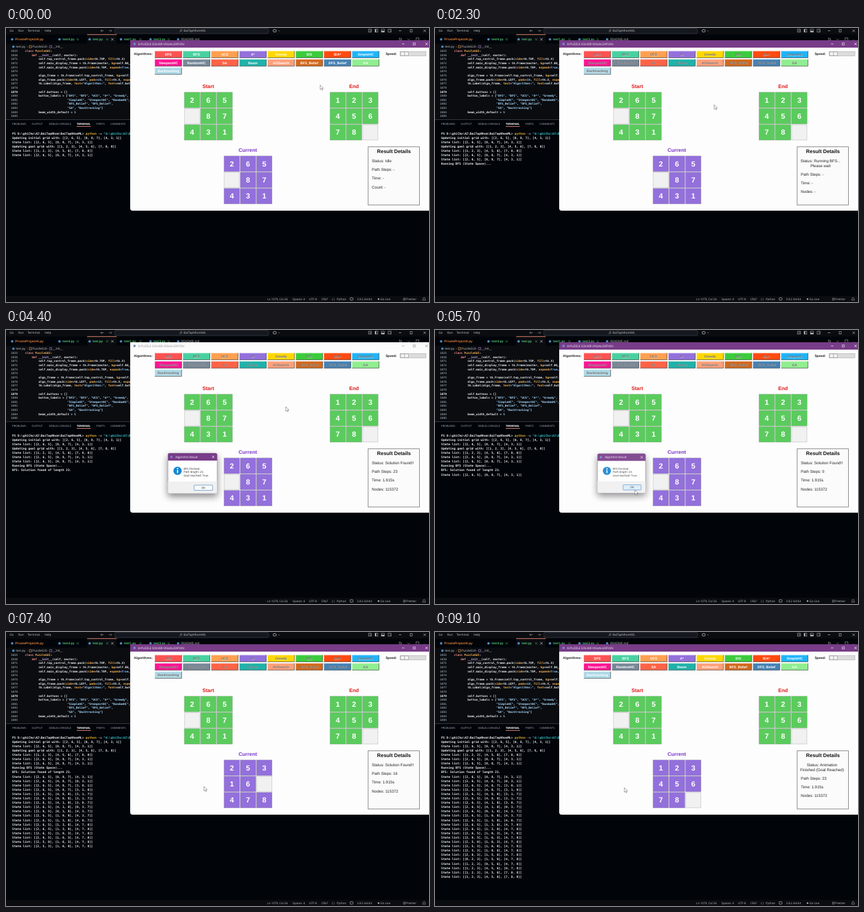
Write an HTML page that moves like this. It is 688 px wide and 447 px high and loops after 9.2 s.

```html
<!DOCTYPE html>
<html>
<head>
<meta charset="utf-8">
<title>8-puzzle solver</title>
<style>
html, body { margin: 0; width: 100%; height: 100%; overflow: hidden; background: #010409; }
svg { display: block; width: 688px; height: 447px; text-rendering: geometricPrecision; }
text { white-space: pre; }
.ui { font-family: "Open Sans", sans-serif; }
.tk { font-family: "Liberation Sans", Arial, sans-serif; }
.mono { font-family: "DejaVu Sans Mono", monospace; font-weight: 700; }
#dialog { filter: drop-shadow(0 5px 6px #0007); transform-origin: 303px 234px; }
</style>
</head>
<body>
<svg viewBox="0 0 688 447">
  <g id="editor"></g>
  <g id="term"></g>
  <g id="app"></g>
  <g id="live"></g>
  <g id="dialog"></g>
  <path id="cursor" d="M0 0V7.4L1.8 5.8L3 8.4L4.2 7.9L3.1 5.4H5.2Z" fill="#fff" stroke="#444" stroke-width=".5"/>
</svg>
<script>
const LOOP = 9200, CLICK = 1200, FOUND = 3200, CLOSE = 5660, PLAY = 5690, STEP = 105;
const ACCENT = '#783c88', EDITOR = '#0a0c10', PANEL = '#010409', ORANGE = '#ff967d';
const $ = id => document.getElementById(id);
const esc = s => String(s).replace(/&/g, '&amp;').replace(/</g, '&lt;');

// y is the optical middle of the line
const text = (x, y, s, size, fill, font = 'ui', extra = '') =>
  `<text class="${font}" x="${x}" y="${y + size * .35}" font-size="${size}" fill="${fill}" ${extra}>${s}</text>`;
const mid = 'text-anchor="middle" ', bold = 'font-weight="700"';
const rect = (x, y, w, h, fill, extra = '') =>
  `<rect x="${x}" y="${y}" width="${w}" height="${h}" fill="${fill}" ${extra}/>`;
const line = (d, color, w = .7) => `<path d="${d}" fill="none" stroke="${color}" stroke-width="${w}"/>`;
const dot = (x, y, r, fill) => `<circle cx="${x}" cy="${y}" r="${r}" fill="${fill}"/>`;
const cross = (x, y, color) => line(`M${x - 2} ${y - 2}l4 4m0 -4l-4 4`, color);
const winButtons = (xs, y, color) =>
  line(`M${xs[0] - 2} ${y}h4`, color) +
  rect(xs[1] - 1.8, y - 1.8, 3.6, 3.6, 'none', `stroke="${color}" stroke-width=".6"`) + cross(xs[2], y, color);

// --- puzzle ---------------------------------------------------------
const start = [2, 6, 5, 0, 8, 7, 4, 3, 1], goal = [1, 2, 3, 4, 5, 6, 7, 8, 0];
const shift = { U: -3, D: 3, L: -1, R: 1 };
const states = [start];
for (const m of 'DRRULDLURDRULURDLULDDRR') {
  const s = [...states.at(-1)], a = s.indexOf(0), b = a + shift[m];
  [s[a], s[b]] = [s[b], s[a]];
  states.push(s);
}
const show = s => `[${[0, 3, 6].map(i => `[${s.slice(i, i + 3).join(', ')}]`).join(', ')}]`;
const stateLine = s => 'State list: ' + show(s);

function grid(x0, y0, cells, color) {
  return cells.map((n, i) => {
    const x = x0 + i % 3 * 26.4, y = y0 + Math.floor(i / 3) * 26.4;
    return n
      ? rect(x, y, 25.4, 25.4, color, 'stroke="#9a9a9a" stroke-width=".4"') +
        text(x + 12.7, y + 12.6, n, 12, '#fff', 'tk', mid + bold)
      : rect(x + .3, y + .3, 24.8, 24.8, '#f1f1f1', 'stroke="#888" stroke-width=".6" stroke-dasharray="1 .8"');
  }).join('');
}

// --- code editor ----------------------------------------------------
const code = `class PuzzleGUI:
    def __init__(self, master):
        self.top_control_frame.pack(side=tk.TOP, fill=tk.X)
        self.main_display_frame = tk.Frame(master, bg=self.BG_COLOR)
        self.main_display_frame.pack(side=tk.TOP, expand=True, fill=tk.BOTH)

        algo_frame = tk.Frame(self.top_control_frame, bg=self.BG_COLOR)
        algo_frame.pack(side=tk.LEFT, padx=10, fill=tk.X, expand=True)
        tk.Label(algo_frame, text="Algorithms:", font=self.button_font)

        self.buttons = []
        button_labels = ["DFS", "BFS", "UCS", "A*", "Greedy", "IDS", "IDA*",
                         "SimpleHC", "SteepestHC", "RandomHC", "SA",
                         "BFS_Belief", "DFS_Belief",
                         "GA", "Backtracking"]
        beam_width_default = 5`.split('\n');
const hues = ['#addcff', '#ff9492', '#ffb757', '#dbb7ff', '#91cbff'];
const paint = s => s.replace(
  /("[^"]*"?)|\b(class|def)\b|\b(PuzzleGUI|\w+(?==))|\b(__init__)\b|\b(\d+|True)\b/g,
  (m, ...g) => `<tspan fill="${hues[g.findIndex(v => v)]}">${m}</tspan>`);

function editor() {
  let o = rect(0, 0, 688, 447, PANEL) + rect(0, 0, 688, 149, EDITOR) + rect(0, 10.5, 688, 15, PANEL);
  [['Go', 6], ['Run', 20], ['Terminal', 35], ['Help', 63]].forEach(([s, x]) => o += text(x, 4.5, s, 4.9, '#ccc'));
  o += line('M159 4.5h-5m2 -2l-2 2l2 2', '#999') + line('M167 4.5h5m-2 -2l2 2l-2 2', '#777');
  o += rect(177, .5, 250, 8.5, '#15181e', 'rx="2" stroke="#4a505a" stroke-width=".5"');
  o += `<circle cx="285" cy="4" r="1.4" fill="none" stroke="#bbb" stroke-width=".5"/>` + line('M284 5l-1.5 1.7', '#bbb', .5);
  o += text(289, 4.5, 'BaiTapNhomML', 4.9, '#ccc');
  o += rect(434.5, 2.5, 5, 4, 'none', 'rx="1.5" stroke="#bbb" stroke-width=".8"') + line('M443 4l1.2 1.2l1.2 -1.2', '#aaa', .5);
  [592, 602.5, 613, 624].forEach((x, i) => {
    o += rect(x - 2.3, 2, 4.6, 4.8, 'none', 'stroke="#bbb" stroke-width=".6"');
    o += [line(`M${x} 2v4.8m0 -2.4h2.3`, '#bbb', .5), rect(x - 2.3, 2, 2, 4.8, '#bbb'),
      rect(x - 2.3, 4.5, 4.6, 2.3, '#bbb'), line(`M${x + .8} 2v4.8`, '#bbb', .5)][i];
  });
  o += winButtons([641, 659, 681], 4.5, '#ccc');

  o += rect(132, 10.5, 48, 15, EDITOR) + rect(132, 10.3, 48, .9, ORANGE);
  [['PrivateProjectAI.py', 15, '#ff9040'], ['test4.py', 92, '#5fdc84', 115], ['test.py', 141, '#5fdc84', 163],
    ['test1.py', 192, '#5fdc84', 217], ['test3.py', 240, '#5fdc84', 263], ['README.md', 285, '#999']]
    .forEach(([s, x, c, u]) => {
      o += dot(x - 5, 18.5, 2, '#4a8ac0') + text(x, 18.5, s, 5, c, 'ui', 'font-weight="600"');
      if (u) o += text(u, 18.5, 'U', 4.9, '#5fdc84');
    });
  o += cross(173, 18.5, '#ddd') + line('M640 16v5l4 -2.5z', '#ccc', .6) + line('M653 17.5l2 2l2 -2', '#aaa', .6);
  o += rect(667, 16, 4.5, 4.5, 'none', 'stroke="#bbb" stroke-width=".6"') + text(679, 18, '…', 5, '#ccc');
  o += dot(12, 30.5, 2, '#4a8ac0') + text(16, 30.5, 'test.py', 5, '#ccc') + text(34, 30.5, '›', 5, '#aaa') +
    rect(38, 28.8, 3.4, 3.4, 'none', 'stroke="#e8a050" stroke-width=".7"') + text(43, 30.5, 'PuzzleGUI', 5, '#ccc') +
    text(67, 30.5, '›', 5, '#aaa') + rect(71, 28.8, 3.4, 3.4, 'none', 'stroke="#b180d7" stroke-width=".7"') +
    text(76, 30.5, '__init__', 5, '#ccc');

  code.forEach((s, i) => {
    const y = 37.6 + i * 6.63, n = i > 1 ? 1069 + i : [1025, 1036][i];
    o += text(8, y, n, 4.58, n === 1079 ? '#fff' : '#8b939e', 'mono') + text(31, y, paint(s), 4.58, '#f0f3f6', 'mono');
  });
  o += text(8, 143.6, 1085, 4.58, '#8b939e', 'mono');

  o += rect(0, 149, 202, .6, '#5a616b');
  [['PROBLEMS', 10], ['OUTPUT', 42], ['DEBUG CONSOLE', 70], ['TERMINAL', 115], ['PORTS', 147], ['COMMENTS', 170]]
    .forEach(([s, x]) => o += text(x, 156, s, 4.4, x === 115 ? '#fff' : '#b0b6be', 'ui', x === 115 ? bold : ''));
  o += rect(115, 160.2, 23, .9, ORANGE);

  o += rect(0, 437, 688, 10, EDITOR);
  [['Ln 1079, Col 26', 425], ['Spaces: 4', 466], ['UTF-8', 493], ['CRLF', 513], ['{ }', 530], ['Python', 538],
    ['3.8.2 64-bit', 571], ['Go Live', 609], ['Prettier', 651]].forEach(([s, x]) => o += text(x, 442.3, s, 4.7, '#c4c8ce'));
  o += rect(559.5, 440, 5, 4, 'none', 'rx="1.5" stroke="#bbb" stroke-width=".8"') + dot(606, 442.3, 1.3, '#bbb');
  o += `<circle cx="648" cy="442.3" r="1.9" fill="none" stroke="#bbb" stroke-width=".6"/>` + line('M646.7 443.6l2.6 -2.6', '#bbb', .5);
  return o + line('M677.5 444h5l-.8 -1v-1.5a1.7 1.7 0 0 0 -3.4 0v1.5z', '#bbb', .6);
}

// --- solver window --------------------------------------------------
const buttons = [
  ['DFS', '#ff5252'], ['BFS', '#48d1a0'], ['UCS', '#ffa050'], ['A*', '#9370db'],
  ['Greedy', '#ffd700'], ['IDS', '#3ccb3c'], ['IDA*', '#ff4a10'], ['SimpleHC', '#1eb4fa'],
  ['SteepestHC', '#ff1493'], ['RandomHC', '#778899'], ['SA', '#ff6347'], ['Beam', '#20b2aa'],
  ['AOSearch', '#ffa07a'], ['BFS_Belief', '#d2691e'], ['DFS_Belief', '#4682b4'], ['GA', '#90ee90'],
  ['Backtracking', '#add8e6']];
const place = i => [242 + i % 8 * 45.85, 37.5 + Math.floor(i / 8) * 13.5];

function app() {
  let o = '<path d="M202 20H688V298H206Q202 298 202 294Z" fill="#fdfdfd"/>';
  o += text(208, 42, 'Algorithms:', 5.4, '#222', 'tk', bold) + text(617.5, 42.5, 'Speed:', 5.4, '#222', 'tk', bold);
  o += rect(641, 38.5, 42, 7, '#dcdcdc', 'stroke="#999" stroke-width=".5"') +
    rect(642, 39, 12.5, 6, '#f4f4f4', 'stroke="#777" stroke-width=".5"') + line('M648.2 39v6', '#777', .6);
  buttons.forEach(([, c], i) => {
    const [x, y] = place(i);
    o += rect(x, y, 44, 11.4, c) + line(`M${x} ${y + 11}V${y + .3}H${x + 44}`, '#fff9', .6) +
      line(`M${x} ${y + 11.1}H${x + 43.7}V${y}`, '#555', .8);
  });
  o += text(329, 95, 'Start', 8.3, '#e01818', 'tk', mid + bold) + text(566, 95, 'End', 8.3, '#e01818', 'tk', mid + bold) +
    text(393.3, 199, 'Current', 8.3, '#7a35c8', 'tk', mid + bold);
  o += grid(290, 104.8, start, '#5bcb5e') + grid(527, 104.8, goal, '#5bcb5e');
  return o + rect(589, 193.8, 83.5, 95, '#fbfbfb', 'stroke="#666" stroke-width=".8"') +
    text(631, 201.5, 'Result Details', 8.3, '#111', 'tk', mid + bold);
}

function titleBar(focused) {
  const ink = focused ? '#fff' : '#8a8a8a';
  return rect(202, 20, 486, 12, focused ? ACCENT : '#fbfbfb') + dot(209, 26, 2, '#6f8fd0') +
    text(215, 26, '8-PUZZLE SOLVER VISUALIZATION', 4.8, ink) + winButtons([646, 664, 684], 26, ink);
}

function dialog(hover) {
  return rect(263.4, 201, 80, 65.6, '#fff', 'rx="2.5" stroke="#8a6a96" stroke-width=".5"') +
    `<path d="M263.4 213V203.5Q263.4 201 265.9 201H340.9Q343.4 201 343.4 203.5V213Z" fill="${ACCENT}"/>` +
    '<path d="M263.4 247H343.4V264.1Q343.4 266.6 340.9 266.6H265.9Q263.4 266.6 263.4 264.1Z" fill="#f0f0f0"/>' +
    dot(269, 207, 1.8, '#6f8fd0') + text(275.5, 207, 'Algorithm Result', 4.7, '#fff') + cross(337, 207, '#fff') +
    dot(279, 229.7, 6.8, '#1a86d0') + rect(278.2, 228.3, 1.7, 5.2, '#fff') + dot(279.05, 226.2, 1.1, '#fff') +
    ['BFS finished.', 'Path length: 23.', 'Goal reached: True.'].map((s, i) => text(289, 226 + i * 5.6, s, 4.5, '#222')).join('') +
    rect(306, 253, 30, 8.6, hover ? '#dcecf8' : '#fafafa', 'rx="1" stroke="#3a86c4" stroke-width=".7"') +
    text(321, 257.2, 'OK', 4.5, '#222', 'ui', mid);
}

function labels(active) {
  return buttons.map(([s], i) => {
    const [x, y] = place(i), put = (d, c) => text(x + 22 + d, y + 5.6 + d, s, 5.5, c, 'tk', mid + bold);
    return active ? put(0, '#fff') : put(.5, '#fff8') + put(0, '#6d6d6d');
  }).join('');
}

function results(t, step, done) {
  const running = t >= CLICK && t < FOUND, found = t >= FOUND;
  const status = done ? ['Status: Animation', 'Finished (Goal Reached)'] :
    found ? ['Status: Solution Found!!'] : running ? ['Status: Running BFS...', 'Please wait'] : ['Status: Idle'];
  const two = status.length > 1, put = (x, y, s, e) => text(x, y, s, 6.4, '#222', 'tk', e);
  let o = status.map((s, i) => two ? put(done ? 629.5 : 627, 217 + i * 7.3, s, mid) : put(595, 217, s)).join('');
  return o + [`Path Steps: ${found ? (step < 0 ? 23 : step) : '-'}`, `Time: ${found ? '1.915s' : '-'}`,
    `${t < CLICK ? 'Count' : 'Nodes'}: ${found ? 115372 : '-'}`]
    .map((s, i) => put(595, (two ? 238.3 : 231) + i * 14.2, s)).join('');
}

function terminal(t, step) {
  const out = ['Updating initial grid with: ' + show(start), stateLine(start),
    'Updating goal grid with: ' + show(goal), stateLine(goal), stateLine(start)];
  if (t >= CLICK) out.push(stateLine(start), 'Running BFS (State Space)...');
  if (t >= FOUND) out.push('BFS: Solution found of length 23.');
  out.push(...states.slice(0, step + 1).map(stateLine));
  const prompt = 'PS D:\\ghiChu\\AI\\BaiTapNhom\\BaiTapNhomML&gt; <tspan fill="#f0b72f">python</tspan> ' +
    '<tspan fill="#9ea7b3">-u</tspan> <tspan fill="#39c5cf">"d:\\ghiChu\\AI\\BaiTapNhom</tspan>';
  return [prompt, ...out.map(esc)].map((s, i) => text(10, 172 + i * 7.1, s, 4.85, '#f0f3f6', 'mono')).join('');
}

// --- motion ---------------------------------------------------------
const path = [[0, 511, 93], [250, 511, 93], [950, 311, 44], [1250, 311, 44], [1500, 334, 56], [2200, 454, 125],
  [4600, 455, 125], [5350, 325, 260], [5750, 325, 261], [6500, 322, 252], [7500, 322, 252], [9000, 308, 254], [LOOP, 308, 254]];
function pointer(t) {
  const i = path.findIndex(p => p[0] > t), a = path[i - 1], b = path[i];
  const u = (t - a[0]) / (b[0] - a[0]), k = u * u * (3 - 2 * u);
  return [1, 2].map(j => a[j] + (b[j] - a[j]) * k);
}

$('editor').innerHTML = editor();
$('app').innerHTML = app();
let last = '';

function draw(t) {
  const raw = Math.floor((t - PLAY) / STEP), step = Math.max(-1, Math.min(23, raw));
  const done = raw > 23, active = t < CLICK || done, hover = t > 5300;
  const focused = t < FOUND || t >= CLOSE;
  const key = [t < CLICK, t < FOUND, step, done, hover, focused].join();
  if (key !== last) {
    last = key;
    $('term').innerHTML = terminal(t, step);
    $('live').innerHTML = titleBar(focused) + labels(active) +
      grid(354.6, 208.8, states[Math.max(0, step)], '#9370db') + results(t, step, done);
    $('dialog').innerHTML = dialog(hover);
  }
  const fade = Math.max(0, Math.min(1, (t - CLOSE) / 140));
  $('dialog').style.opacity = t < FOUND ? 0 : 1 - fade ** 2;
  $('dialog').style.transform = `scale(${1 - fade * .08})`;
  $('cursor').setAttribute('transform', `translate(${pointer(t)})`);
}

const t0 = performance.now();
function tick() {
  draw((performance.now() - t0) % LOOP);
  requestAnimationFrame(tick);
}
tick();
</script>
</body>
</html>
```
